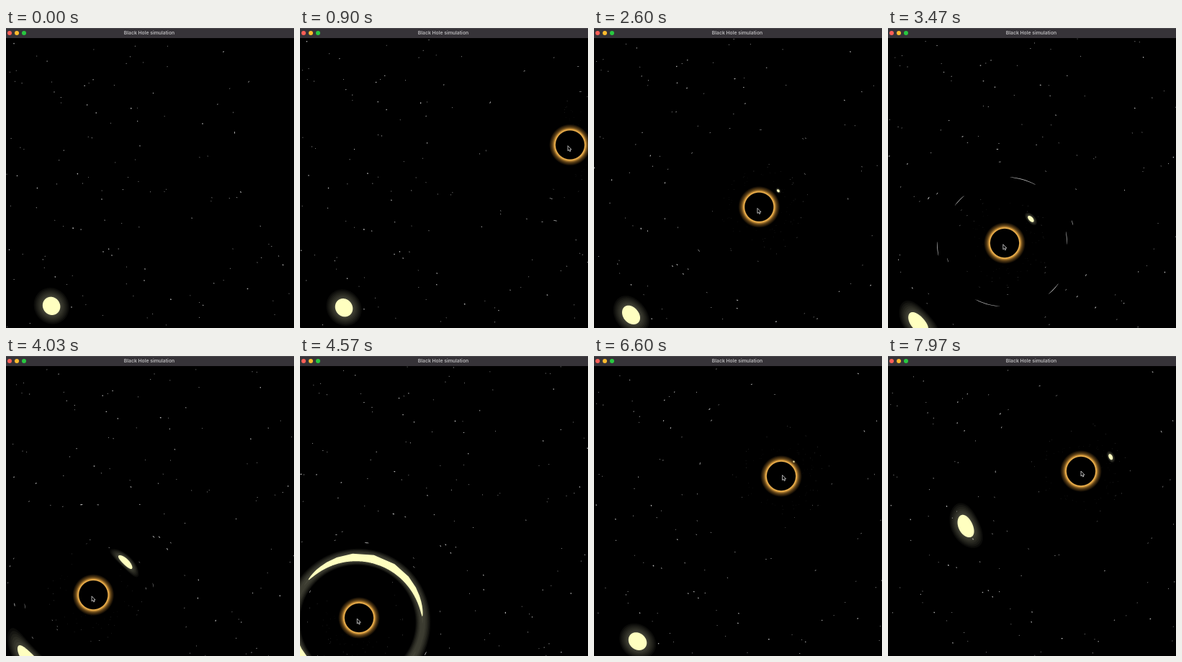
These frames come from a looping animation (400 by 417 pixels, 8 s). An HTML page with a canvas:

```html
<!DOCTYPE html>
<html lang="en">
<head>
<meta charset="utf-8">
<title>Black Hole simulation</title>
<style>
  html, body { margin: 0; width: 100%; height: 100%; overflow: hidden; background: #000; }
  canvas { position: absolute; left: 0; top: 0; }
  header {
    position: absolute; left: 0; top: 0; width: 400px; height: 14px;
    background: #363338; box-shadow: inset 0 1px #4b494d; color: #b9b8ba;
    font: 600 6.8px/14px Inter, sans-serif; text-align: center; text-indent: -2px;
  }
  i { position: absolute; top: 4px; width: 6px; height: 6px; border-radius: 50%; }
</style>
</head>
<body>
<canvas id="sky" width="400" height="417"></canvas>
<header>
  <i style="left:2px;background:#ff5f57"></i>
  <i style="left:12px;background:#febc2e"></i>
  <i style="left:22px;background:#28c840"></i>
  Black Hole simulation
</header>
<script>
const ctx = document.getElementById('sky').getContext('2d');
const LOOP = 8000, WIDTH = 400, HEIGHT = 417;
const EINSTEIN = 90, SUN_RADIUS = 12.4, GLOW_RADIUS = 29, STAR_COUNT = 150;

// Drag of the black hole: time, x, y
const holeKeys = [
  [0, 441, 136], [400, 402, 152], [630, 402, 152], [1530, 312, 187], [3470, 162, 299],
  [4570, 82, 364], [5630, -12, 401], [6600, 260, 167], [6750, 268, 160]
];

let seed = 11;
const random = () => (seed = seed * 16807 % 2147483647) / 2147483647;
const mix = (a, b, p) => a + (b - a) * p;
const clamp = p => Math.min(1, Math.max(0, p));

function holeAt(time) {
  const next = holeKeys.findIndex(key => key[0] > time);
  const n = next < 0 ? holeKeys.length - 1 : next;
  const [t0, x0, y0] = holeKeys[n - 1], [t1, x1, y1] = holeKeys[n];
  const p = clamp((time - t0) / (t1 - t0));
  return { x: mix(x0, x1, p), y: mix(y0, y1, p) };
}

// The sun rests, then falls along a curve towards the hole
function sunAt(time) {
  const p = clamp((time - 7150) / 820);
  const curve = (a, b, c) => mix(mix(a, b, p), mix(b, c, p), p);
  return { x: curve(78, 12, 149), y: curve(376.5, 300, 217) };
}

// Undo the deflection to find where a star really is
function unlens([x, y], hole) {
  const dx = x - hole.x, dy = y - hole.y;
  const k = 1 - EINSTEIN ** 2 / (dx * dx + dy * dy);
  return { x: hole.x + dx * k, y: hole.y + dy * k };
}

// Landmark stars as they appear at time 0; the rest are scattered
const landmarks = [
  [302, 33], [273, 133], [326, 228], [133, 238], [193, 335], [192, 351],
  [91, 388], [135, 311], [142.6, 307.2], [147, 316], [-22, 402]
];
const stars = landmarks.map(point => ({ ...unlens(point, holeAt(0)), radius: 0.75 }));
for (let n = 0; n < STAR_COUNT; n++) {
  stars.push({
    x: mix(-20, WIDTH, random()),
    y: mix(10, HEIGHT, random()),
    radius: 0.45 + 0.45 * random() ** 4
  });
}

// Outer and inner lensed image of a disc; even-odd filling joins them into a ring
function fillLensed({ x, y }, radius, hole, steps) {
  ctx.beginPath();
  for (const side of [1, -1]) {
    for (let n = 0; n < steps; n++) {
      const angle = n / steps * 2 * Math.PI;
      const dx = x + radius * Math.cos(angle) - hole.x;
      const dy = y + radius * Math.sin(angle) - hole.y;
      const dist = Math.hypot(dx, dy) || 1e-6;
      const k = (1 + side * Math.sqrt(1 + (2 * EINSTEIN / dist) ** 2)) / 2;
      ctx[n ? 'lineTo' : 'moveTo'](hole.x + dx * k, hole.y + dy * k);
    }
    ctx.closePath();
  }
  ctx.fill('evenodd');
}

function drawSun(sun, hole) {
  ctx.fillStyle = 'rgba(255, 255, 195, 0.045)';
  for (let r = 2 * SUN_RADIUS; r > SUN_RADIUS; r -= 2) fillLensed(sun, r, hole, 300);
  ctx.fillStyle = '#ffffc0';
  fillLensed(sun, SUN_RADIUS, hole, 300);
}

function drawHole({ x, y }) {
  const glow = ctx.createRadialGradient(x, y, 19.5, x, y, GLOW_RADIUS);
  glow.addColorStop(0, '#000');
  glow.addColorStop(0.12, '#f0b450');
  glow.addColorStop(0.22, '#dca041');
  glow.addColorStop(0.5, 'rgba(200, 140, 50, 0.5)');
  glow.addColorStop(1, 'rgba(180, 120, 40, 0)');
  ctx.fillStyle = glow;
  ctx.beginPath();
  ctx.arc(x, y, GLOW_RADIUS, 0, 2 * Math.PI);
  ctx.fill();
}

const arrow = new Path2D('M0 0V7L1.6 5.6L2.7 8L3.9 7.4L2.9 5.2H5Z');
function drawCursor({ x, y }) {
  ctx.save();
  ctx.translate(x, y);
  ctx.fillStyle = '#000';
  ctx.strokeStyle = '#ddd';
  ctx.lineWidth = 0.8;
  ctx.fill(arrow);
  ctx.stroke(arrow);
  ctx.restore();
}

function draw(time) {
  const hole = holeAt(time);
  ctx.fillStyle = '#000';
  ctx.fillRect(0, 0, WIDTH, HEIGHT);
  ctx.fillStyle = '#bbb';
  for (const star of stars) fillLensed(star, star.radius, hole, 24);
  drawSun(sunAt(time), hole);
  drawHole(hole);
  drawCursor(holeAt(time + 30)); // the hole trails the pointer slightly
}

let start;
function tick(now) {
  start ??= now;
  draw((now - start) % LOOP);
  requestAnimationFrame(tick);
}
requestAnimationFrame(tick);
</script>
</body>
</html>
```
